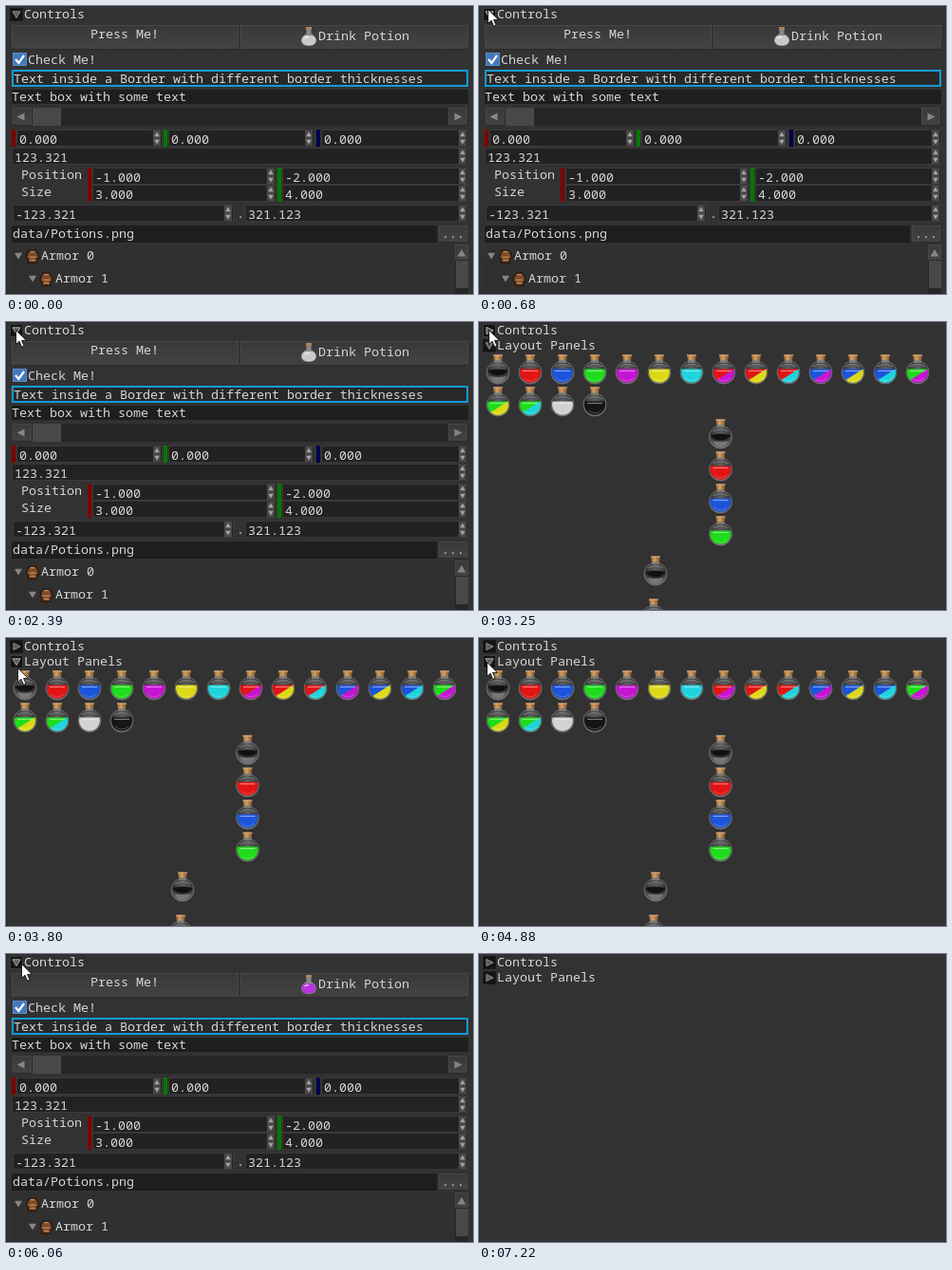
These frames come from a looping animation (492 by 303 pixels, 7680 ms). An HTML page:

```html
<!DOCTYPE html>
<html lang="en">
<head>
<meta charset="utf-8">
<title>Controls</title>
<style>
html, body { margin: 0; width: 100%; height: 100%; overflow: hidden; background: #323232; }
svg { display: block; width: 492px; height: 303px; }
text { font: 13.333px "Noto Sans Mono", "DejaVu Sans Mono", monospace; fill: #d6d6d6; white-space: pre; }
</style>
</head>
<body>
<svg id="stage" viewBox="0 0 492 303">
  <defs>
    <linearGradient id="face" x1="0" y1="0" x2="0" y2="1">
      <stop offset="0" stop-color="#393939"/><stop offset="1" stop-color="#434343"/>
    </linearGradient>
    <linearGradient id="cork" x1="0" x2="1">
      <stop offset="0" stop-color="#8a6038"/><stop offset=".4" stop-color="#d3a066"/><stop offset="1" stop-color="#7b522c"/>
    </linearGradient>
    <radialGradient id="glass" cx=".5" cy=".3" r=".75">
      <stop offset="0" stop-color="#606060"/><stop offset=".6" stop-color="#343434"/><stop offset="1" stop-color="#8a8a8a"/>
    </radialGradient>
  </defs>
  <rect width="492" height="303" fill="#323232"/>
  <path d="M.5 0V303" stroke="#2a2a2a"/>
  <g id="controls"></g>
  <g id="panels"></g>
  <g id="headers"></g>
  <path id="cursor" d="M.5 .5V15.5L4 12.2 6.6 18.3 9 17.2 6.5 11.4H11.3Z" fill="#fff" stroke="#111" stroke-width=".9"/>
</svg>
<script>
const LOOP = 7680;
const $ = id => document.getElementById(id);

// Markup helpers
const rect = (x, y, w, h, fill, stroke = 'none') =>
  `<rect x="${x}" y="${y}" width="${w}" height="${h}" fill="${fill}" stroke="${stroke}"/>`;
const path = (d, fill, stroke = 'none', width = 1) =>
  `<path d="${d}" fill="${fill}" stroke="${stroke}" stroke-width="${width}"/>`;
const text = (x, y, s) => `<text x="${x}" y="${y}">${s}</text>`;
const at = (x, y, s, scale = 1) => `<g transform="translate(${x} ${y}) scale(${scale})">${s}</g>`;

const TRI = {
  down: 'M-4.5-3.5H4.5L0 4Z', up: 'M-4.5 3.5H4.5L0-4Z',
  right: 'M-3.5-4V4L4.5 0Z', left: 'M3.5-4V4L-4.5 0Z'
};
const tri = (x, y, dir, fill = '#858585', scale = 1) => at(x, y, path(TRI[dir], fill), scale);
const button = (x, y, w, h) => rect(x + .5, y + .5, w - 1, h - 1, 'url(#face)', '#484848') +
  path(`M${x} ${y + h - .5}H${x + w}`, 'none', '#2a2a2a');

function numberBox(x, y, w, value, bar) {
  const s = x + w - 10;
  const spin = [0, 8].map((dy, i) => rect(s, y + 1 + dy, 8, 8, '#484848') +
    tri(s + 4, y + 5 + dy, i ? 'down' : 'up', '#a4a4a4', .62)).join('');
  return (bar ? rect(x - 5, y, 4, 18, bar) : '') +
    rect(x + .5, y + .5, w - 1, 17, '#222', '#3a3a3a') + spin + text(x + 3, y + 15, value);
}

// Potion, origin at the middle of the ball
function potion(a, b = a) {
  const wet = 'M-10.5-3.5A11 11 0 1 0 10.5-3.5Z';
  const half = 'M10.5-3.5A11 11 0 0 1-7.5 8Z';
  const fill = a === 'empty'
    ? path('M-10.5-2Q0-5 10.5-2Q8 3 0 3.5Q-8 3-10.5-2Z', '#111') +
      path('M-8.5 4Q0 6 8.5 4Q5 10.5 0 10.5Q-5 10.5-8.5 4Z', '#777')
    : path(wet, a) + (b !== a ? path(half, b) : '') +
      path('M-8-1.5H8', 'none', '#ffffff70', 1.2) +
      path('M-7 6Q0 12 7 6', 'none', '#ffffff38');
  return '<circle r="12" fill="url(#glass)" stroke="#707070" stroke-width=".9"/>' + fill +
    path('M-8-6Q0-11 8-6', 'none', '#a8a8a870', 1.3) +
    rect(-4, -14, 8, 4, '#777') + path('M-5-18.5H5L4-12.5H-4Z', 'url(#cork)') +
    path('M-5-18H5', 'none', '#dfb27c');
}

function flask(liquid) {
  return path('M-2.5-9H2.5V-3Q8 0 8 5Q7 10 0 10Q-7 10-8 5Q-8 0-2.5-3Z', '#888') +
    path('M-4-1H4Q8 1 7.5 5Q6 9.5 0 9.5Q-6 9.5-7.5 5Q-8 1-4-1Z', liquid) +
    rect(-3, -10, 6, 3, '#a98258') + path('M-5 2Q-3 0 0 1', 'none', '#ffffffa0', 1.5);
}

const armor = path('M-3-5.5H3L5-2 6 2 4 3V6.5H-4V3L-6 2-5-2Z', '#7d4a28', '#1c120b') +
  path('M-2-4H2M-3 1H3M-2.5 4H2.5', 'none', '#c58d5a');

const RED = '#800000', GREEN = '#007a00', BLUE = '#000050';

$('controls').innerHTML =
  button(6, 20, 239, 26) + text(89, 34, 'Press Me!') +
  button(247, 20, 240, 26) + text(329, 36, 'Drink Potion') +
  `<g id="grey">${at(319, 32, flask('#c9c9c9'))}</g><g id="purple">${at(319, 32, flask('#b638dc'))}</g>` +
  rect(7.5, 49.5, 14, 13, '#4278bd', '#5d8cc8') +
  path('M10 56L13.3 60 19 52', 'none', '#fff', 2.2) + text(23, 61, 'Check Me!') +
  `<rect x="7" y="68" width="479" height="16" fill="#282828" stroke="#139bd5" stroke-width="2"/>` +
  text(8, 81, 'Text inside a Border with different border thicknesses') +
  rect(6, 88, 481, 15, '#1e1e1e') + text(6, 100, 'Text box with some text') +
  rect(7, 107, 480, 19, '#262626') + button(7, 107, 20, 19) + button(466, 107, 20, 19) +
  rect(28, 107, 30, 19, '#484848') + tri(16, 116.5, 'left') + tri(476, 116.5, 'right') +
  numberBox(11, 130, 154, '0.000', RED) +
  numberBox(171, 130, 154, '0.000', GREEN) +
  numberBox(332, 130, 155, '0.000', BLUE) +
  numberBox(6, 149, 481, '123.321') +
  text(16, 182, 'Position') + text(16, 200, 'Size') +
  numberBox(91, 170, 194, '-1.000', RED) + numberBox(291, 170, 196, '-2.000', GREEN) +
  numberBox(91, 188, 194, '3.000', RED) + numberBox(291, 188, 196, '4.000', GREEN) +
  numberBox(7, 209, 233, '-123.321') + text(243, 223, '.') +
  numberBox(252, 209, 235, '321.123') +
  rect(6, 231, 448, 18, '#1e1e1e') + text(7, 244, 'data/Potions.png') +
  button(456, 231, 30, 18) + text(459, 244, '...') +
  rect(6, 251, 467, 52, '#303030') + rect(473, 251, 14, 52, '#262626') +
  button(473, 251, 14, 17) + tri(480, 260, 'up') + rect(474, 268, 13, 29, '#484848') +
  [0, 1].map(i => tri(13 + 15 * i, 263 + 24 * i, 'down', '#858585', .9) +
    at(28 + 14.5 * i, 263 + 24 * i, armor, 1.1) + text(37 + 15 * i, 267 + 24 * i, 'Armor ' + i)).join('');

// Primary colours, then each mixed with each secondary
const first = ['#e31414', '#1b55dc', '#1edc1b'], second = ['#c615d2', '#dcd818', '#1fd3dc'];
const mixes = first.flatMap(a => second.map(b => [a, b]));
const brews = [['empty'], ...[...first, ...second].map(c => [c]), ...mixes, ['#d2d2d2'], ['#151515']];

$('panels').innerHTML =
  brews.map((c, i) => at(20 + 34 * (i % 14), 53 + 34 * Math.floor(i / 14), potion(...c))).join('') +
  brews.slice(0, 4).map((c, i) => at(254.5, 121 + 34 * i, potion(...c))).join('') +
  at(186, 265, potion('empty')) + at(184, 310, potion(first[0]));

const header = (id, y, label) => `<g id="${id}"><g transform="translate(11 ${y})">` +
  `<rect x="-6.5" y="-6.5" width="13" height="13"/><path transform="scale(.9)"/></g>${text(19, y + 4, label)}</g>`;
$('headers').innerHTML = header('head0', 9, 'Controls') + header('head1', 25, 'Layout Panels');

// Cursor stops: time, x, y
const MOVES = [
  [70, 472, 235], [150, 400, 190], [220, 290, 125], [300, 170, 65], [380, 80, 25], [450, 25, 0], [530, 9, 2],
  [680, 9, 3], [910, 9, 15], [1000, 10, 8],
  [3330, 16, 14], [3400, 70, 35], [3480, 150, 58], [3560, 240, 74], [3630, 297, 81],
  [3800, 12, 31], [3870, 9, 28], [3950, 8, 25],
  [5670, 13, 18], [5720, 16, 10],
  [6910, 40, 40], [6990, 130, 120], [7070, 250, 210], [7140, 379, 290], [7220, -50, -50]
];
// Clicks: press time, release time, header
const CLICKS = [
  [1150, 1230, 0], [2240, 2390, 0], [3170, 3250, 0], [4100, 4270, 1],
  [4800, 4880, 1], [5340, 5420, 1], [5890, 6060, 0], [6610, 6680, 0]
];

const show = (id, on) => $(id).style.display = on ? '' : 'none';

function drawHeader(i, open, hover, pressed) {
  const [box, mark] = $('head' + i).firstChild.children;
  box.setAttribute('fill', pressed ? '#050505' : '#141414');
  box.setAttribute('stroke', pressed ? '#666' : hover ? '#3c3c3c' : '#1c1c1c');
  mark.setAttribute('d', open ? TRI.down : TRI.right);
  mark.setAttribute('fill', '#5c5c5c');
  mark.setAttribute('stroke', hover ? '#b8b8b8' : '#949494');
}

function draw(t) {
  const [, x, y] = MOVES.filter(m => m[0] <= t).pop() || [0, -50, -50];
  $('cursor').setAttribute('transform', `translate(${x} ${y})`);
  const open = [true, true];
  for (const [, up, i] of CLICKS) if (t >= up) open[i] = !open[i];
  show('controls', open[0]);
  show('panels', !open[0] && open[1]);
  show('head1', !open[0]);
  show('grey', t < 6060);
  show('purple', t >= 6060);
  [9, 25].forEach((cy, i) => {
    const hover = Math.abs(x - 11) <= 7 && Math.abs(y - cy) <= 7;
    drawHeader(i, open[i], hover, CLICKS.some(c => c[2] === i && t >= c[0] && t < c[1]));
  });
}

const start = performance.now();
function tick(now) {
  draw(Math.max(0, now - start) % LOOP);
  requestAnimationFrame(tick);
}
draw(0);
requestAnimationFrame(tick);
</script>
</body>
</html>
```
